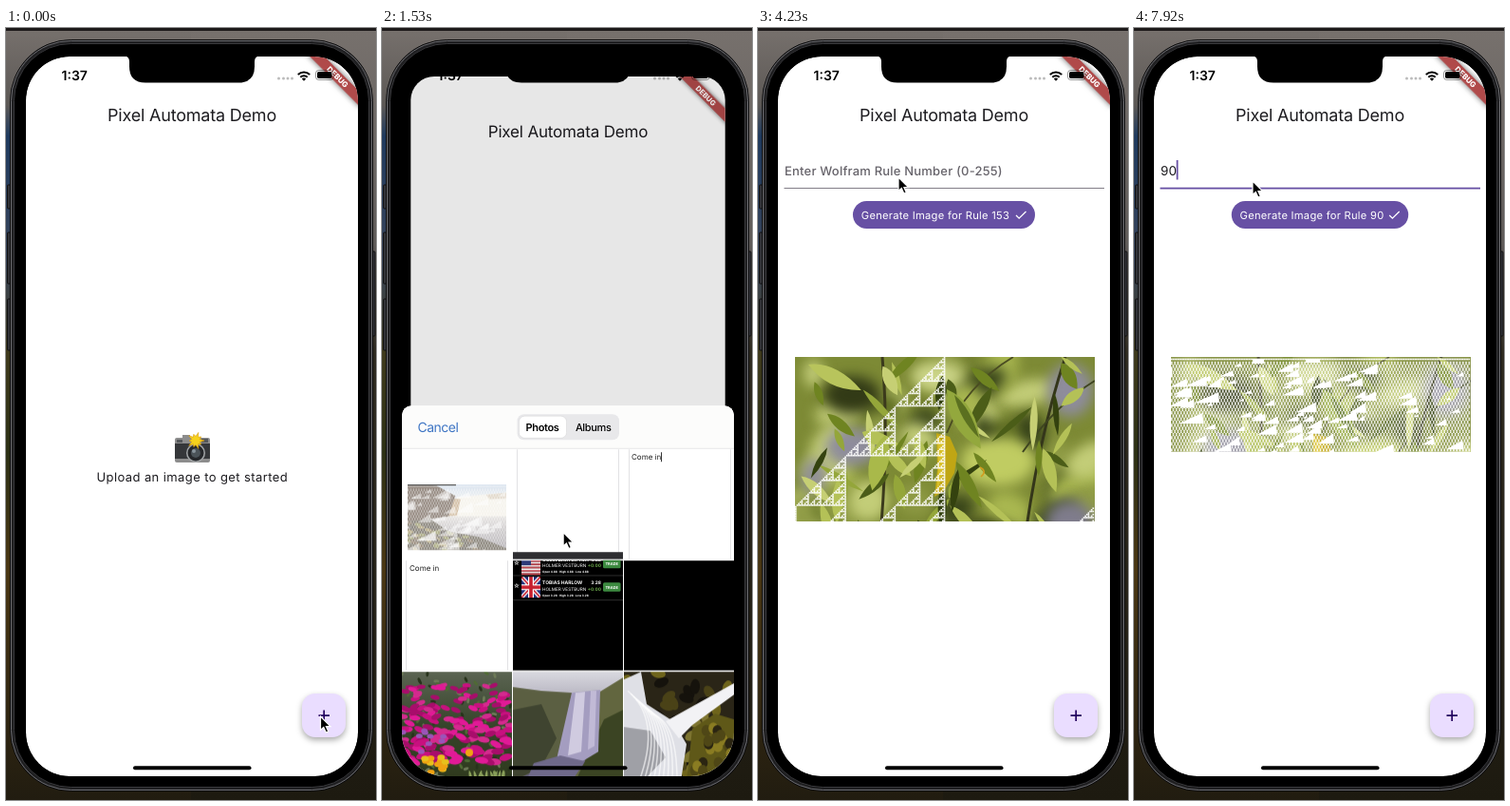
Write an HTML page with a canvas that moves like this. It is 390x812 px and loops after 8 s.

```html
<!DOCTYPE html>
<html lang="en">
<head>
<meta charset="utf-8">
<title>Pixel Automata Demo</title>
<style>
html,body{margin:0;width:100%;height:100%;overflow:hidden;background:#1b1810}
#stage{position:absolute;left:0;top:0;width:390px;height:812px;overflow:hidden}
svg,canvas,.box{position:absolute;left:0;top:0}
svg{font-family:Inter,"Open Sans",sans-serif;text-rendering:geometricPrecision}
#screen{left:21px;top:30px;width:350px;height:757px;border-radius:46px;overflow:hidden;background:#000}
#app{width:350px;height:757px;background:#fff;overflow:hidden;transform-origin:175px 0}
#pic{left:18px;top:316px}
#sheet{top:47px;width:350px;height:720px;background:#fff;border-radius:10px 10px 0 0;overflow:hidden}
#grid{top:45px}
#fab{filter:drop-shadow(0 3px 3px #0005)}
#ribbon rect{filter:drop-shadow(0 0 3px #0009)}
</style>
</head>
<body>
<div id="stage">
<svg width="390" height="812">
  <defs>
    <linearGradient id="wl" x2="0" y2="1">
      <stop offset="0" stop-color="#77716d"/><stop offset=".1" stop-color="#5c5855"/>
      <stop offset=".14" stop-color="#1f3a5e"/><stop offset=".3" stop-color="#38445a"/>
      <stop offset=".42" stop-color="#3f3a1c"/><stop offset=".55" stop-color="#2c3015"/>
      <stop offset=".7" stop-color="#4a3714"/><stop offset="1" stop-color="#211c10"/>
    </linearGradient>
    <linearGradient id="wr" x2="0" y2="1">
      <stop offset="0" stop-color="#77716d"/><stop offset=".28" stop-color="#5e5a58"/>
      <stop offset=".42" stop-color="#2e2a20"/><stop offset="1" stop-color="#1d1a10"/>
    </linearGradient>
  </defs>
  <rect width="195" height="812" fill="url(#wl)"/>
  <rect x="195" width="195" height="812" fill="url(#wr)"/>
  <rect width="390" height="3" fill="#1d1a1a"/>
  <g fill="#34353a" stroke="#111">
    <rect x="1.5" y="165" width="5" height="25" rx="1"/><rect x="1.5" y="215" width="5" height="54" rx="1"/>
    <rect x="1.5" y="285" width="5" height="54" rx="1"/><rect x="384" y="235" width="5" height="89" rx="1"/>
  </g>
  <rect x="4.5" y="12.5" width="382" height="790" rx="64" fill="#1f1f21" stroke="#0c0c0d"/>
  <rect x="5.5" y="13.5" width="380" height="788" rx="63" fill="none" stroke="#6c6c70"/>
  <rect x="8.5" y="16.5" width="374" height="782" rx="60" fill="#000" stroke="#38383b"/>
</svg>

<div id="screen" class="box">
  <div id="app" class="box">
    <svg width="350" height="757" viewBox="21 30 350 757">
      <text x="196" y="98" font-size="18" letter-spacing="-.2" text-anchor="middle" fill="#1c1b1f">Pixel Automata Demo</text>
      <g id="intro">
        <path d="M186 428h8v3h-8zM178 433q0-2 2-2h33q2 0 2 2v22q0 2-2 2h-33q-2 0-2-2z" fill="#8d8d8d"/>
        <path d="M178 437h37v16h-37z" fill="#35373a"/><path d="M180 433h6v3h-6zM206 432h7v4h-7z" fill="#55585b"/>
        <circle cx="200" cy="447" r="10" fill="#a3a6a8"/><circle cx="200" cy="447" r="8.5" fill="#26282b"/>
        <circle cx="200" cy="447" r="5" fill="#4b5358"/><circle cx="198" cy="445" r="2" fill="#87939a"/>
        <path id="flash" fill="#f6d21c" stroke="#d99a10" stroke-width=".6"/>
        <text x="196.300" y="477" font-size="13" letter-spacing=".4" text-anchor="middle" fill="#1c1b1f">Upload an image to get started</text>
      </g>
      <path id="spin" fill="none" stroke="#65549a" stroke-width="3.5"/>
      <g id="form">
        <text id="hint" x="28" y="155" font-size="13" font-weight="500" letter-spacing=".2" fill="#66636a">Enter Wolfram Rule Number (0-255)</text>
        <text id="typed" x="28" y="155" font-size="13.500" letter-spacing=".2" fill="#1c1b1f"></text>
        <rect id="caret" y="139" width="1.800" height="20.500" fill="#6750a4"/>
        <rect id="line" x="27.500" width="337.500"/>
        <rect id="btn" y="182" height="29" rx="14.500" fill="#6750a4"/>
        <text id="label" y="200.700" font-size="11.200" letter-spacing=".25" fill="#fff"></text>
        <path id="tick" d="M0 197l3.200 3.200L10.500 193" fill="none" stroke="#fff" stroke-width="1.300"/>
      </g>
      <g id="fab"><rect x="312" y="700" width="46" height="46" rx="14" fill="#eaddff"/></g>
      <path d="M329.500 723.200h11.500M335.200 717.500v11.500" stroke="#21005d" stroke-width="1.700"/>
      <g id="ribbon" transform="translate(371 30) rotate(45)">
        <rect x="-40" y="25" width="80" height="10.800" fill="#b04a4a"/>
        <text y="33.300" font-size="8" font-weight="800" text-anchor="middle" fill="#fff">DEBUG</text>
      </g>
    </svg>
    <canvas id="pic" width="316" height="210"></canvas>
    <svg width="350" height="757"><rect id="dim" width="350" height="757"/></svg>
  </div>
  <svg width="350" height="757" viewBox="21 30 350 757">
    <text x="58.500" y="55" font-size="14" font-weight="600">1:37</text>
    <g fill="#0004"><circle cx="287.500" cy="53" r="1.500"/><circle cx="292.500" cy="53" r="1.500"/><circle cx="297" cy="53" r="1.500"/><circle cx="301.500" cy="53" r="1.500"/></g>
    <path d="M307.800 49a8.800 8.800 0 0 1 12.400 0M310.300 51.700a5.200 5.200 0 0 1 7.400 0" fill="none" stroke="#000" stroke-width="2"/>
    <path d="M314 55.800l-2.200-2.300a3.100 3.100 0 0 1 4.400 0z"/>
    <rect x="326.500" y="44.500" width="18.500" height="10" rx="3" fill="none" stroke="#0006"/>
    <rect x="328" y="46" width="15.500" height="7" rx="1.700"/>
    <path d="M346 48q1.500 1.500 0 3z" fill="#0006"/>
  </svg>
  <div id="sheet" class="box">
    <canvas id="grid" width="350" height="470"></canvas>
    <svg id="sheetText" width="350" height="720" viewBox="21 77 350 720">
      <rect x="21" y="77" width="350" height="45" fill="#fcfcfb"/>
      <rect x="21" y="121.500" width="350" height="1" fill="#e6e6e8"/>
      <text x="37.500" y="105" font-size="14" letter-spacing="-.5" fill="#3f76c4">Cancel</text>
      <rect x="142.500" y="86" width="107.500" height="27" rx="7" fill="#e8e8ea"/>
      <rect x="144.500" y="88" width="50" height="23" rx="6" fill="#fff" stroke="#0001"/>
      <g font-size="11" letter-spacing="-.35" text-anchor="middle">
        <text x="169" y="103.500" font-weight="600">Photos</text><text x="222.700" y="103.500" font-weight="500">Albums</text>
      </g>
      <g font-size="8" fill="#222"><text x="263" y="134">Come in</text><text x="29" y="251">Come in</text></g>
      <rect x="294" y="126" width=".8" height="10"/>
      <clipPath id="listClip"><rect x="138" y="239.500" width="116" height="115"/></clipPath>
      <g id="list" clip-path="url(#listClip)" fill="#fff" font-weight="700"></g>
    </svg>
  </div>
</div>

<svg width="390" height="812">
  <path d="M125 29.500q5 .5 5 6v5q0 17 17 17h98q17 0 17-17v-5q0-5.500 5-6z"/>
  <rect x="134" y="776.300" width="124.500" height="4" rx="2"/>
  <path id="mouse" d="M0 0V14.500L3.300 11.500L5.800 17L8.300 16L5.900 10.600H10.500Z" stroke="#fff" stroke-width="1.200"/>
</svg>
</div>

<script>
const $ = id => document.getElementById(id);
const LOOP = 8000, W = 316, H = 209, COLS = 193, ROWS = 128, CELL = H / ROWS;

// ---------- drawing helpers ----------
function rng(seed) {
  return () => {
    seed = (seed + 0x6d2b79f5) | 0;
    let n = Math.imul(seed ^ (seed >>> 15), 1 | seed);
    n = (n + Math.imul(n ^ (n >>> 7), 61 | n)) ^ n;
    return ((n ^ (n >>> 14)) >>> 0) / 4294967296;
  };
}
function canvas(w, h) {
  const c = document.createElement('canvas');
  c.width = w; c.height = h;
  return c;
}
function fade(g, h, ...stops) {
  const f = g.createLinearGradient(0, 0, 0, h);
  stops.forEach((s, i) => f.addColorStop(i / (stops.length - 1), s));
  return f;
}
function rect(g, fill, x, y, w, h) { g.fillStyle = fill; g.fillRect(x, y, w, h); }
function poly(g, fill, ...p) {
  g.fillStyle = fill;
  g.beginPath();
  for (let i = 0; i < p.length; i += 2) g.lineTo(p[i], p[i + 1]);
  g.fill();
}
function blob(g, fill, x, y, rx, ry, rot = 0) {
  g.fillStyle = fill;
  g.beginPath();
  g.ellipse(x, y, rx, ry, rot, 0, 7);
  g.fill();
}
function leaf(g, fill, x, y, len, wid, rot) {
  g.save();
  g.translate(x, y); g.rotate(rot);
  g.fillStyle = fill;
  g.beginPath();
  g.moveTo(0, 0);
  g.quadraticCurveTo(len * .4, -wid, len, 0);
  g.quadraticCurveTo(len * .5, wid, 0, 0);
  g.fill();
  g.restore();
}
function curve(g, color, width, x0, y0, cx, cy, x1, y1) {
  g.strokeStyle = color; g.lineWidth = width;
  g.beginPath(); g.moveTo(x0, y0); g.quadraticCurveTo(cx, cy, x1, y1); g.stroke();
}
function scatter(n, seed, fn) {
  const r = rng(seed);
  for (let i = 0; i < n; i++) fn(r, i);
}
const pick = (list, r) => list[Math.floor(r() * list.length)];

// ---------- pictures ----------
function paintLeaves() {
  const c = canvas(W, H), g = c.getContext('2d');
  rect(g, '#7d8a35', 0, 0, W, H);
  g.filter = 'blur(7px)';
  scatter(45, 4, r => blob(g, pick(['#a9b750', '#5d6c22', '#39451a', '#8f9b45', '#c3cd78'], r), r() * W, r() * H, 12 + r() * 20, 8 + r() * 14, r() * 3));
  blob(g, '#8e8c9c', 60, 95, 28, 20); blob(g, '#8e8c9c', 290, 35, 24, 28);
  blob(g, '#7f7c8c', 290, 175, 26, 24); blob(g, '#918f98', 20, 125, 14, 18);
  blob(g, '#2b3312', 190, 190, 50, 18); blob(g, '#c0cc62', 215, 110, 40, 26);
  blob(g, '#323a16', 60, 40, 30, 20); blob(g, '#cbd487', 150, 20, 28, 14);
  g.filter = 'blur(.7px)';
  curve(g, '#3b3a1c', 3, 88, 209, 100, 90, 92, 0);
  curve(g, '#34361a', 3, 285, 0, 255, 90, 240, 209);
  curve(g, '#3e4420', 2, 240, 100, 275, 50, 316, 25);
  curve(g, '#4a4c22', 2, 160, 80, 180, 30, 230, 0);
  scatter(58, 12, r => leaf(g, pick(['#6f8421', '#94a63a', '#b4c157', '#4b5d18', '#34420f', '#c6cf74'], r), r() * W, r() * H - 8, 24 + r() * 34, 5 + r() * 9, .5 + r() * 2.2));
  leaf(g, '#93a83d', 160, 34, 72, 22, 1.05);
  leaf(g, '#5b7020', 168, 40, 52, 8, 1.05);
  leaf(g, '#b8c45c', 14, 8, 62, 16, .45);
  leaf(g, '#a9b94a', 95, 82, 60, 20, 1.8);
  poly(g, '#c0a614', 149, 80, 163, 84, 171, 102, 168, 122, 157, 141, 147, 147, 150, 118);
  poly(g, '#d8c02a', 150, 82, 158, 92, 156, 122, 149, 144, 151, 116);
  curve(g, '#d29a1e', 1.5, 195, 116, 203, 120, 196, 126);
  return c;
}
function paintFlowers(g) {
  rect(g, fade(g, 115, '#5b6452', '#36442a', '#2f3a1d'), 0, 0, 116, 115);
  scatter(90, 3, r => blob(g, pick(['#4f6a34', '#27331b', '#6d7a58'], r), r() * 116, r() * 115, 3, 1.5, r() * 3));
  scatter(150, 8, r => {
    const y = 14 + r() * 82;
    blob(g, pick(['#c8107f', '#e01a96', '#a80d6b', '#d42a8e'], r), r() * 116, y, 4 + y / 30, 2 + y / 60, r() - .5);
  });
  scatter(10, 6, r => blob(g, '#9a55b8', r() * 45, 62 + r() * 28, 3.5, 2.5));
  scatter(14, 2, r => blob(g, pick(['#f0a312', '#e8c01c'], r), 22 + r() * 24, 90 + r() * 20, 4, 3));
  blob(g, '#f0a312', 71, 85, 4, 4);
  scatter(14, 5, r => leaf(g, '#8aa05a', 70 + r() * 40, 115, 12, 3, -1.2 - r()));
}
function paintFalls(g) {
  rect(g, fade(g, 115, '#d9d9df', '#8d889c', '#575369'), 0, 0, 116, 115);
  poly(g, '#5b5f42', 0, 16, 30, 20, 62, 22, 60, 60, 48, 92, 0, 115);
  poly(g, '#3f4430', 0, 40, 30, 34, 46, 70, 30, 100, 0, 115);
  poly(g, '#62663f', 90, 22, 116, 6, 116, 115, 60, 115, 84, 86);
  poly(g, '#3b4423', 96, 50, 116, 40, 116, 115, 66, 115);
  poly(g, '#a49dc0', 62, 22, 92, 19, 90, 84, 70, 96, 46, 92);
  poly(g, '#d0cbe0', 66, 22, 76, 21, 72, 84, 58, 88);
  poly(g, '#c1bad6', 82, 20, 88, 20, 86, 78, 79, 82);
  poly(g, '#6f698a', 22, 96, 50, 88, 76, 94, 62, 115, 14, 115);
}
function paintStream(g) {
  rect(g, '#2a2517', 0, 0, 116, 115);
  scatter(60, 21, r => blob(g, pick(['#6e641b', '#4a4217', '#15120c', '#7d7430'], r), r() * 116, r() * 115, 8, 5, r() * 3));
  poly(g, '#dfe0e6', 0, 8, 18, 0, 24, 34, 52, 52, 66, 76, 60, 115, 0, 115);
  poly(g, '#9fa0a6', 0, 58, 28, 62, 44, 90, 20, 115, 0, 115);
  poly(g, '#f2f2f5', 44, 52, 116, 12, 116, 24, 72, 56, 58, 70);
  scatter(9, 9, (r, i) => curve(g, '#ffffffa0', 1.5, 4 + i * 3, 20 + i * 3, 40 + i * 2, 50, 16 + i * 5, 115));
  poly(g, '#5f5818', 72, 60, 96, 44, 116, 50, 116, 115, 66, 115);
  scatter(22, 15, r => blob(g, pick(['#8a7c22', '#2b2512', '#4f4716'], r), 74 + r() * 42, 58 + r() * 57, 5, 6));
}
function paintBay(g) {
  rect(g, fade(g, 115, '#b9cbe0', '#f2efe8', '#aaa5a6', '#77727a'), 0, 0, 116, 115);
  poly(g, '#efeadf', 58, 22, 116, 14, 116, 56, 54, 56);
  poly(g, '#b08c5e', 54, 24, 62, 26, 58, 54, 44, 56);
  poly(g, '#c9b9a0', 92, 18, 116, 14, 116, 24, 96, 26);
  poly(g, '#3a2615', 0, 0, 34, 2, 56, 20, 48, 56, 0, 66);
  poly(g, '#2b2110', 0, 64, 26, 60, 48, 82, 84, 92, 116, 112, 116, 115, 0, 115);
  scatter(70, 31, r => {
    const x = r() * 90, y = 66 + r() * 49;
    if (y > 58 + x * .48) blob(g, pick(['#6a6a22', '#4a3216', '#85702f', '#1d160b'], r), x, y, 4, 2.5, r());
  });
}
function paintDune(g) {
  rect(g, fade(g, 115, '#cfd3e4', '#e6e6ec', '#7d8a62', '#3c4f22'), 0, 0, 116, 115);
  poly(g, '#a9aa98', 0, 62, 30, 52, 70, 46, 116, 36, 116, 70, 0, 80);
  poly(g, '#8b927a', 40, 62, 80, 48, 116, 46, 116, 80, 30, 80);
  rect(g, fade(g, 115, '#7f8f52', '#6f8645', '#33471b'), 0, 74, 116, 41);
  scatter(130, 41, r => leaf(g, pick(['#4d6a26', '#7f9a45', '#2f4518', '#96a85e', '#a23a44'], r), r() * 116, 84 + r() * 34, 12 + r() * 14, 1.7, -1.3 - r() * .6));
  scatter(28, 44, r => blob(g, '#b5405a', r() * 116, 40 + r() * 28 + r() * 30, 1.2, 1));
  for (let i = 0; i < 3; i++) curve(g, '#4c4c50', .8, 0, 4 + i * 14, 20, 24 + i * 12, 44 - i * 4, 56 + i * 2);
  blob(g, '#f1efb0', 76, 76, 9, 5); blob(g, '#e2cf4a', 76, 78, 4, 2.5);
}
function flag(g, y, uk) {
  g.save();
  g.translate(9, y);
  g.beginPath(); g.rect(0, 0, 20, 22); g.clip();
  if (uk) {
    rect(g, '#1f2f7a', 0, 0, 20, 22);
    for (const [c, w] of [['#fff', 4], ['#c8202f', 1.6]]) {
      curve(g, c, w, 0, 0, 10, 11, 20, 22); curve(g, c, w, 20, 0, 10, 11, 0, 22);
    }
    rect(g, '#fff', 7, 0, 6, 22); rect(g, '#fff', 0, 8, 20, 6);
    rect(g, '#c8202f', 8.2, 0, 3.6, 22); rect(g, '#c8202f', 0, 9.2, 20, 3.6);
  } else {
    for (let i = 0; i < 13; i++) rect(g, i % 2 ? '#fff' : '#c23a45', 0, i * 1.7, 20, 1.7);
    rect(g, '#2d3a78', 0, 0, 10, 12);
  }
  g.restore();
}

// ---------- automata ----------
function growRule(g, rule) {
  let row = Array(COLS).fill(1);
  row[96] = 0;
  for (let y = 0; y < ROWS; y++) {
    row.forEach((v, x) => { if (!v) rect(g, '#fffffff0', x * CELL, y * CELL, CELL, CELL); });
    row = row.map((v, x) => rule >> (row[(x + COLS - 1) % COLS] * 4 + v * 2 + row[(x + 1) % COLS]) & 1);
  }
}
function mesh(g, cols, rows, cell, shards) {
  for (let y = 0; y < rows; y++)
    for (let x = 0; x < cols; x++)
      if (y == 1 || (y > 2 && (2 * x - y + 4 * rows) % 4 < 2)) rect(g, '#ffffffe8', x * cell, y * cell, cell, cell);
  scatter(shards, 77, r => {
    const x = r() * cols * cell, y = 4 + r() * rows * cell, h = 2 + r() * 9, w = h * (1.3 + r());
    poly(g, '#fff', x, y, x + 1, y + h, x - w, y + h);
  });
}

const leaves = paintLeaves();
function withLeaves(fn) {
  const c = canvas(W, H), g = c.getContext('2d');
  g.drawImage(leaves, 0, 0);
  fn(g);
  return c;
}
const first = withLeaves(g => growRule(g, 153));
const second = withLeaves(g => {
  rect(g, '#ffffff18', 0, 0, W, H);
  mesh(g, COLS, ROWS, CELL, 190);
  rect(g, '#fff', 86, 2, 12, 5); rect(g, '#fff', 142, 2, 15, 4);
});

// ---------- photo grid ----------
function paintGrid() {
  const g = $('grid').getContext('2d');
  const cell = (c, r, fn) => {
    g.save();
    g.translate(117 * c, 117 * r + 1);
    g.beginPath(); g.rect(0, 0, 116, 115.5); g.clip();
    fn(g);
    g.restore();
  };
  const edges = (a, b) => () => { rect(g, '#e2e2e4', a, 0, 1, 116); rect(g, '#e2e2e4', b, 0, 1, 116); };
  cell(0, 0, () => {
    g.translate(6, 37);
    g.beginPath(); g.rect(0, 0, 104, 69); g.clip();
    g.save(); g.scale(.9, .6); paintBay(g); g.restore();
    rect(g, '#ffffff70', 0, 0, 104, 69);
    g.globalAlpha = .5; mesh(g, 75, 50, 1.4, 50); g.globalAlpha = 1;
    rect(g, '#333', 0, 0, 51, 1);
  });
  cell(1, 0, () => { edges(4, 111)(); rect(g, '#2e2e31', 0, 108, 116, 8); });
  cell(2, 0, edges(5, 112));
  cell(0, 1, edges(4, 111));
  cell(1, 1, () => {
    rect(g, '#000', 0, 0, 116, 116);
    flag(g, -7, false); flag(g, 17, true);
    rect(g, '#444', 0, 15.5, 116, .7); rect(g, '#444', 0, 41, 116, .7);
  });
  cell(2, 1, () => rect(g, '#000', 0, 0, 116, 116));
  cell(0, 2, paintFlowers);
  cell(1, 2, paintFalls);
  cell(2, 2, paintStream);
  cell(0, 3, paintBay);
  cell(1, 3, () => g.drawImage(leaves, 53, 0, 209, 209, 0, 0, 116, 116));
  cell(2, 3, paintDune);
}
const entry = (y, name, price) => `
  <text x="138.500" y="${y + 13}" font-size="6.500" font-weight="400">☆</text>
  <text x="169" y="${y + 9}" font-size="5">${name}</text>
  <text x="169" y="${y + 15.500}" font-size="4.700" font-weight="400">HOLMER VESTBURN</text>
  <text x="169" y="${y + 21.500}" font-size="3.100" xml:space="preserve">Open ${price}   High ${price}   Low ${price}</text>
  <text x="231" y="${y + 9}" font-size="4.800" text-anchor="end">${price}</text>
  <text x="231" y="${y + 15.500}" font-size="4.800" text-anchor="end" fill="#6fae4e">+0.00</text>
  <rect x="233" y="${y + 7}" width="18.500" height="9.500" rx="1.500" fill="#3c8a40"/>
  <text x="242.200" y="${y + 13.300}" font-size="4" text-anchor="middle">TRADE</text>`;
$('list').innerHTML = entry(231.5, 'COLIN BARTER-HAY', '4.88') + entry(256, 'TOBIAS HARLOW', '3.28');
paintGrid();

let star = '';
for (let i = 0; i < 20; i++) {
  const r = i % 2 ? 4.5 : 9 - i % 4, a = i * Math.PI / 10;
  star += (i ? 'L' : 'M') + (200 + r * Math.cos(a)) + ' ' + (434 + r * Math.sin(a));
}
$('flash').setAttribute('d', star + 'Z');

// ---------- motion ----------
const PATH = [
  [0, 331.5, 724], [240, 331.5, 724], [1006, 191, 532], [1500, 191, 532], [2220, 211, 249],
  [2730, 211, 249], [3500, 148, 157], [4480, 148, 157], [4890, 154, 174], [6400, 154, 174],
  [6800, 172, 196], [7050, 172, 196], [7700, 125, 161], [8000, 125, 161]
];
const clamp = (v, a = 0, b = 1) => Math.max(a, Math.min(b, v));
const smooth = u => u * u * (3 - 2 * u);
const spring = t => t <= 0 ? 0 : 1 - (1 + .0188 * t) * Math.exp(-.0188 * t);
const set = (id, props) => { for (const k in props) $(id).setAttribute(k, props[k]); };
const show = (id, on) => { $(id).style.display = on ? '' : 'none'; };

function moveMouse(t) {
  const i = PATH.findIndex(p => p[0] > t), [t0, x0, y0] = PATH[i - 1], [t1, x1, y1] = PATH[i];
  const u = smooth((t - t0) / (t1 - t0));
  set('mouse', { transform: `translate(${x0 + (x1 - x0) * u} ${y0 + (y1 - y0) * u})` });
}
function drawSheet(t) {
  const p = spring(t - 180) - spring(t - 1450), app = $('app').style;
  app.transform = `translateY(${38 * p}px) scale(${1 - .097 * p})`;
  app.borderRadius = `${46 - 36 * p}px`;
  set('dim', { opacity: .17 * p });
  show('sheet', p > .001);
  $('sheet').style.transform = `translateY(${(1 - p) * 712}px)`;
}
function drawSpinner(t) {
  const on = t >= 1300 && t < 2580;
  show('spin', on);
  if (!on) return;
  const turns = (t - 1936) / 1333, k = Math.floor(turns), u = turns - k;
  const head = smooth(clamp(2 * u)), tail = smooth(clamp(2 * u - 1));
  const a = (155 + (t - 2220) * .162 + (k + tail) * 270) * Math.PI / 180;
  const sweep = Math.max(.1, (head - tail) * 4.71), b = a + sweep, R = 14.4;
  const pt = q => `${196 + R * Math.cos(q)} ${450 + R * Math.sin(q)}`;
  set('spin', { d: `M${pt(a)}A${R} ${R} 0 ${sweep > Math.PI ? 1 : 0} 1 ${pt(b)}` });
}
function drawForm(t) {
  show('form', t >= 2580);
  const typed = t < 6360 ? '' : t < 6640 ? '9' : '90', focus = t >= 4450;
  const label = 'Generate Image for Rule ' + (typed || '153');
  if ($('typed').textContent !== typed) $('typed').textContent = typed;
  if ($('label').textContent !== label) $('label').textContent = label;
  set('hint', { opacity: 1 - clamp((t - 6395) / 35) });
  const blink = 1 - clamp((t - 5280) / 120) + clamp((t - 5960) / 100);
  set('caret', { x: 27.7 + 8.5 * typed.length, opacity: focus ? blink : 0 });
  set('line', { y: focus ? 167.7 : 168, height: focus ? 1.8 : 1, fill: focus ? '#6750a4' : '#827e87' });
  const w = [192, 179.4, 186.4][typed.length], x = 196 - w / 2;
  set('btn', { x, width: w });
  set('label', { x: x + 8.8 });
  set('tick', { transform: `translate(${x + w - 20} 0)` });
}
function drawPicture(t) {
  const g = $('pic').getContext('2d');
  g.clearRect(0, 0, W, 210);
  if (t < 2580) return;
  const again = t >= 6913;
  let at = t;
  if (t < 2730) at = 2580;
  else if (t > 3510 && t < 4230) at = clamp(3600 + Math.floor((t - 3600) / 112.5) * 112.5, 3510, 4050);
  const rows = clamp(Math.floor((at - (again ? 6913 : 2481)) / 16.5), 0, ROWS), h = rows * CELL;
  if (h) g.drawImage(again ? second : first, 0, 0, W, h, 0, 0, W, h);
}
function frame(now) {
  const t = now % LOOP;
  moveMouse(t);
  drawSheet(t);
  show('intro', t < 1300);
  drawSpinner(t);
  drawForm(t);
  drawPicture(t);
}
const origin = performance.now();
function tick() {
  frame(performance.now() - origin);
  requestAnimationFrame(tick);
}
tick();
</script>
</body>
</html>
```
